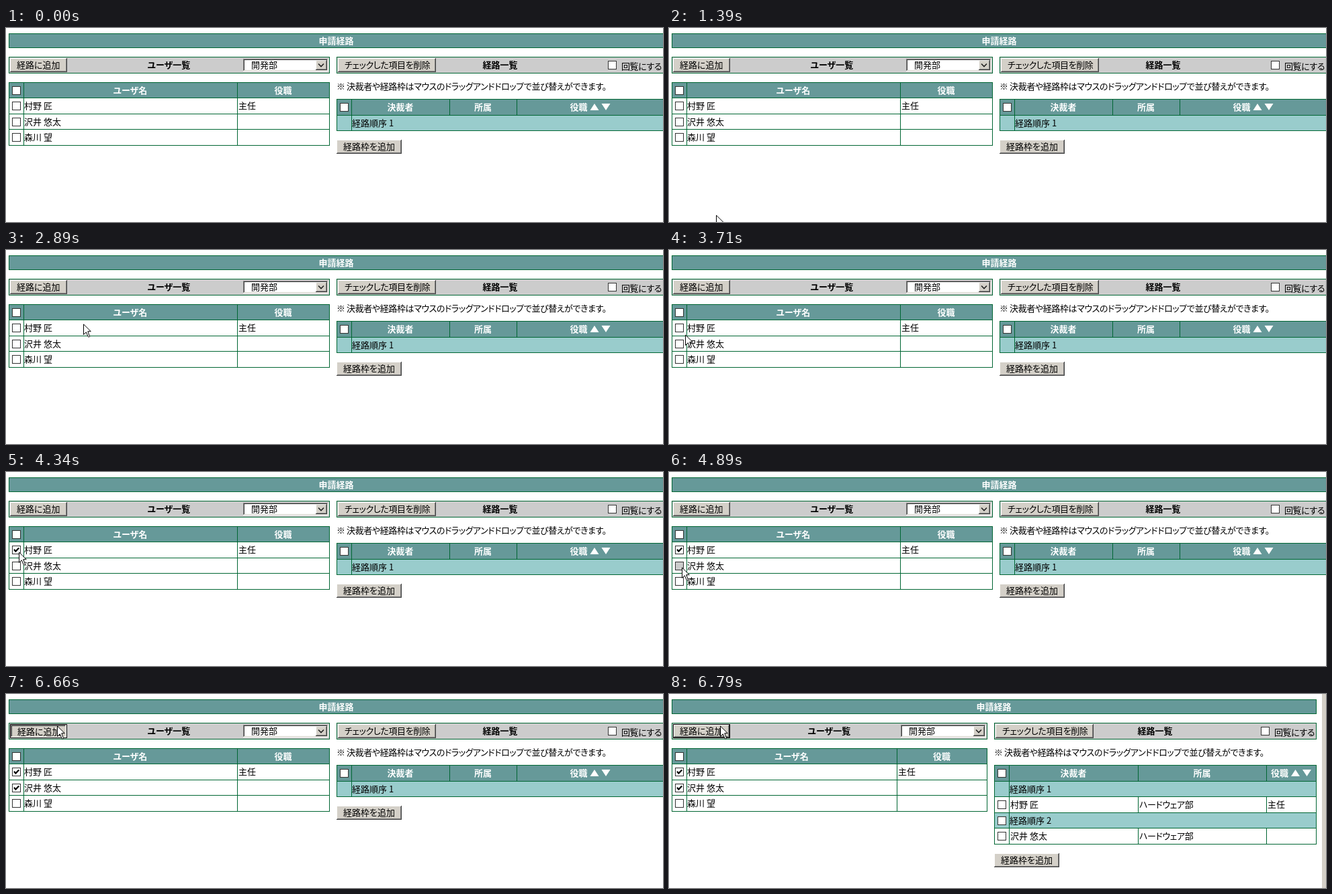
Recreate the animation shown at these times as an HTML page. Size 978 px wide and 290 px high, loop 8000 ms.

```html
<!DOCTYPE html>
<html lang="ja">
<head>
<meta charset="utf-8">
<style>
html, body { margin: 0; width: 100%; height: 100%; overflow: hidden; background: #fff; }
svg { display: block; }
rect { shape-rendering: crispEdges; }
text { font: 13px "Noto Sans CJK JP", "Noto Sans CJK", sans-serif; font-feature-settings: "palt"; }
.kana { letter-spacing: -.4px; }
.bold { font-weight: bold; letter-spacing: 0; }
.mid { text-anchor: middle; }
.white { fill: #fff; }
</style>
</head>
<body>
<svg id="stage" width="978" height="290"></svg>
<script>
const GREEN = '#006633', TEAL = '#669999', PALE = '#99cccc', FACE = '#d4d0c8';
const NAMES = ['村野 匠', '沢井 悠太', '森川 望'];
const stage = document.getElementById('stage');

// The screen refreshes in steps of STEP ms after START; pointer keys are [step, x, y].
const LOOP = 8000, START = 1390, STEP = 135;
const KEYS = [
  [0, 70, 279], [2, 69, 229], [4, 82, 199], [8, 113, 132], [11, 115, 110], [12, 115, 110],
  [13, 49, 104], [16, 28, 115], [17, 24, 126], [20, 19, 119], [22, 19, 119], [25, 19, 142],
  [28, 20, 141], [30, 60, 156], [32, 84, 126], [33, 80, 95], [36, 76, 47]
];

const fill = (x, y, w, h, c) => `<rect x="${x}" y="${y}" width="${w}" height="${h}" fill="${c}"/>`;
const path = (d, attrs, x = 0, y = 0) => `<path d="${d}" transform="translate(${x} ${y})" ${attrs}/>`;
const text = (x, y, s, cls = '') =>
  `<text x="${x}" y="${y}" class="${/[ぁ-ヶー]{3}/.test(s) ? 'kana ' : ''}${cls}">${s}</text>`;
const head = (x, y, s) => text(x, y, s, 'bold mid white');

// Bordered cell whose edge lines lie on pixels x1..x2, y1..y2.
const cell = (x1, y1, x2, y2, c) =>
  fill(x1, y1, x2 - x1 + 1, y2 - y1 + 1, GREEN) + fill(x1 + 1, y1 + 1, x2 - x1 - 1, y2 - y1 - 1, c);

const row = (xs, y1, y2, c) => xs.slice(1).map((x, i) => cell(xs[i], y1, x, y2, c)).join('');

// Two-pixel bevel: outer and inner colours, top-left then bottom-right.
const bevel = (x, y, w, h, [a, b, c, d], face) =>
  fill(x, y, w, h, b) + fill(x, y, w - 1, h - 1, a) +
  fill(x + 1, y + 1, w - 2, h - 2, d) + fill(x + 1, y + 1, w - 3, h - 3, c) +
  fill(x + 2, y + 2, w - 4, h - 4, face);
const RAISED = ['#fff', '#404040', FACE, '#808080'];
const SUNKEN = ['#808080', '#fff', '#404040', FACE];

// state: 0 clear, 1 held down, 2 ticked
const check = (x, y, state = 0) =>
  fill(x, y, 13, 13, '#333') + fill(x + 1, y + 1, 11, 11, state === 1 ? '#ccc' : '#fff') +
  (state === 2 ? path('M3 5.8L5.4 8.6L10.2 3.6', 'fill="none" stroke="#000" stroke-width="2.2"', x, y) : '');

// state: 0 raised, 1 pressed, 2 focused
function button(x, y, w, label, state = 0) {
  const inset = state ? 1 : 0, shift = state === 1 ? 1 : 0;
  return fill(x, y, w, 21, '#000') +
    bevel(x + inset, y + inset, w - 2 * inset, 21 - 2 * inset, shift ? SUNKEN : RAISED, FACE) +
    text(x + 10 + shift, y + 15 + shift, label);
}

const dropdown = x =>
  bevel(x, 46, 127, 19, SUNKEN, '#fff') + bevel(x + 108, 48, 17, 15, RAISED, FACE) +
  path('M0 0L4 4L8 0', 'fill="none" stroke="#222" stroke-width="1.6"', x + 112, 53.5) +
  text(x + 12, 60, '開発部');

function users(right, col, ticks) {
  const xs = [4, 26, col, right], line = i => Math.round(104 + i * 23.6);
  let s = row(xs, 81, 104, TEAL) + check(9, 87) +
    head((26 + col) / 2, 98, 'ユーザ名') + head((col + right) / 2, 98, '役職');
  NAMES.forEach((name, i) => {
    const y = line(i);
    s += row(xs, y, line(i + 1), '#fff') + check(9, y + 6, ticks[i]) + text(27, y + 16.5, name);
  });
  return s + text(col + 2, 121, '主任');
}

// Order rows alternate with the members added to them.
function route(xs, rows) {
  const [x, a, b, c, right] = xs, line = i => Math.floor(130 + i * 23.5);
  const rank = (c + right) / 2 - 30;
  let s = row(xs, 106, 130, TEAL) + check(x + 5, 112) +
    head((a + b) / 2, 123, '決裁者') + head((b + c) / 2, 123, '所属') +
    text(rank, 123, '役職', 'bold white') +
    path('M0 10L6.5 0L13 10ZM17 0H30L23.5 10Z', 'fill="#fff"', rank + 30, 113);
  for (let i = 0; i < rows; i++) {
    const y = line(i), n = i >> 1, base = y + 17;
    s += i % 2
      ? row(xs, y, line(i + 1), '#fff') + text(a + 2, base, NAMES[n]) +
        text(b + 2, base, 'ハードウェア部') + (n ? '' : text(c + 2, base, '主任'))
      : row([x, a, right], y, line(i + 1), PALE) + text(a + 1, base, `経路順序 ${n + 1}`);
    if (i) s += check(x + 5, y + 6);
  }
  return s;
}

function page(added, press, ticks) {
  const left = added ? 473 : 481, x = left + 11, end = added ? 963 : 979;
  const box = added ? 881 : 896;
  const cols = added ? [x, 506, 698, 889, end] : [x, 514, 660, 760, end];
  return cell(4, 8, end, 29, TEAL) + head((4 + end) / 2, 24, '申請経路') +
    cell(4, 43, left, 67, '#ccc') + button(6, 45, 85, '経路に追加', press) +
    text(left / 2 + 2, 60, 'ユーザ一覧', 'bold mid') + dropdown(left - 128) +
    cell(x, 43, end, 67, '#ccc') + button(x + 2, 45, 146, 'チェックした項目を削除') +
    text((x + end) / 2, 60, '経路一覧', 'bold mid') +
    check(box, 49) + text(box + 20, 62, '回覧にする') +
    users(left, added ? 339 : 344, ticks) +
    text(x, 92, '※ 決裁者や経路枠はマウスのドラッグアンドドロップで並び替えができます。') +
    route(cols, added ? 4 : 1) + button(x, added ? 238 : 167, 97, '経路枠を追加') +
    (added ? fill(972, 0, 6, 290, FACE) : '');
}

function pointer(step) {
  if (step < 0) return '';
  const i = KEYS.findLastIndex(k => k[0] <= step);
  const from = KEYS[i], to = KEYS[i + 1] || from;
  const part = (step - from[0]) / (to[0] - from[0] || 1);
  const [x, y] = [1, 2].map(j => Math.round(from[j] + (to[j] - from[j]) * part));
  const overName = x > 26 && x < 60 && y > 100 && y < 120;
  return overName
    ? path('M0 .5H3M4 .5H7M3.5 1V15M0 15.5H3M4 15.5H7', 'stroke="#000"', x, y)
    : path('M.5 1V16.5L4.3 12.8L7.2 19.5Q8.5 21 9.6 19.3L6.8 11.7H11.3Z', 'fill="#fff" stroke="#000"', x, y);
}

let last;
function draw(now) {
  const step = Math.floor((now % LOOP - START) / STEP + 0.2);
  if (step !== last) {
    // 0 before the press, 1 while held, 2 afterwards
    const click = at => Math.max(0, Math.min(2, step - at + 1));
    const press = click(39);
    stage.innerHTML = page(press === 2, press, [click(21), click(26), 0]) + pointer(step);
    last = step;
  }
  requestAnimationFrame(draw);
}
requestAnimationFrame(draw);
</script>
</body>
</html>
```
